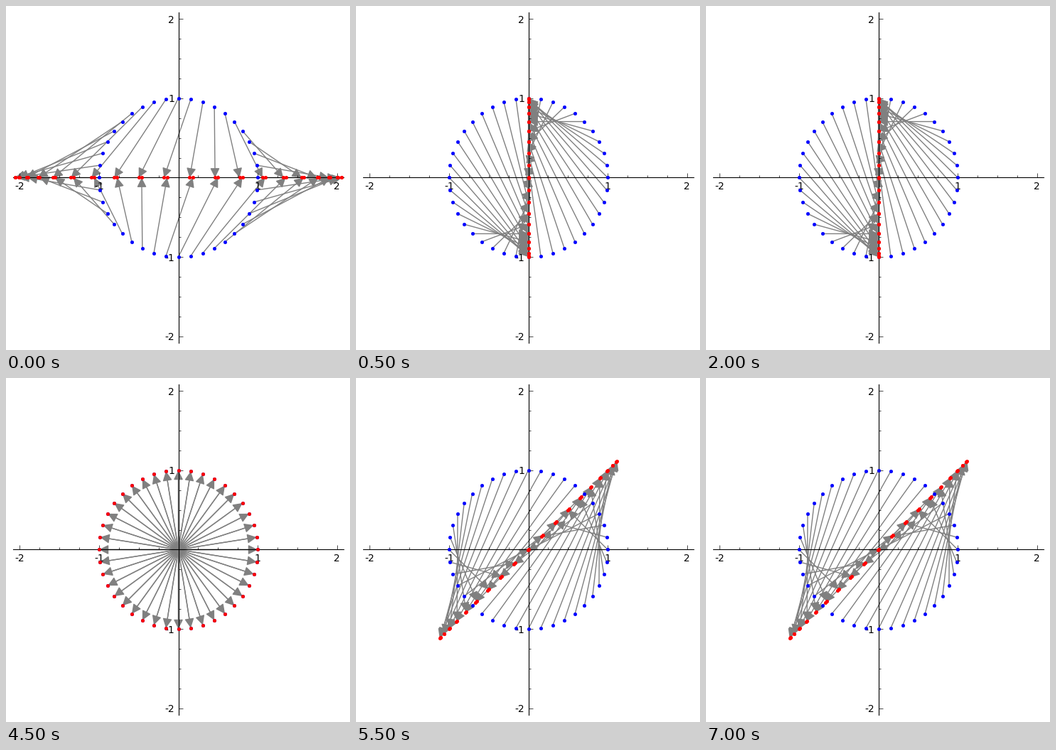
Write a matplotlib script that moves like this. It is 484x484 px and loops after 8000 ms.

```python
import matplotlib.pyplot as plt
import numpy as np
from matplotlib.animation import FuncAnimation
from matplotlib.patches import FancyArrowPatch

SIZE, DPI = 484, 100
UNIT = 111.6      # pixels per data unit
CENTRE = 242.5    # origin, from the left and from the bottom
HALF = 232.3      # half the axis length in pixels
STEP = 500        # ms per frame

# Linear maps shown in turn, with the number of steps each one stays
MAPS = [
    ([[2, -0.5], [0, 0]], 1),
    ([[0, 0], [1, 0]], 5),
    ([[-1, 0], [0, -1]], 5),
    ([[0.5, -1], [0.5, -1]], 5),
]
schedule = [np.array(m) for m, steps in MAPS for _ in range(steps)]

angles = 2 * np.pi * np.arange(40) / 40
circle = np.column_stack([np.cos(angles), np.sin(angles)])

plt.rcParams["font.family"] = "DejaVu Sans"
fig = plt.figure(figsize=(SIZE / DPI, SIZE / DPI), dpi=DPI, facecolor="white")
corner, side = (CENTRE - HALF) / SIZE, 2 * HALF / SIZE
ax = fig.add_axes([corner, corner, side, side])
limit = HALF / UNIT
ax.set(xlim=(-limit, limit), ylim=(-limit, limit))
ax.patch.set_visible(False)
ax.set_axisbelow(False)

for name in ("left", "bottom"):
    ax.spines[name].set_position("zero")
    ax.spines[name].set_linewidth(0.8)
for name in ("right", "top"):
    ax.spines[name].set_visible(False)

major = [-2, -1, 1, 2]
minor = [k / 4 for k in range(-8, 9) if k % 4]
for axis in (ax.xaxis, ax.yaxis):
    axis.set_ticks(major, labels=[str(v) for v in major])
    axis.set_ticks(minor, minor=True)
ax.tick_params(which="major", direction="in", length=4, width=0.5, pad=4,
               labelsize=10)
ax.tick_params(which="minor", direction="in", length=2, width=0.5)

arrows = []
for point in circle:
    arrow = FancyArrowPatch(point, 2 * point, lw=1, color="gray",
                            arrowstyle="-|>,head_width=4,head_length=8",
                            mutation_scale=1, shrinkA=0, shrinkB=0, zorder=2)
    arrows.append(ax.add_patch(arrow))


def dots(color, zorder):
    return ax.scatter(*circle.T, s=10, c=color, edgecolors=color,
                      linewidths=0.5, zorder=zorder, clip_on=False)


dots("blue", 5)
images = dots("red", 6)


def draw(frame):
    mapped = circle @ schedule[frame].T
    for arrow, start, end in zip(arrows, circle, mapped):
        arrow.set_positions(tuple(start), tuple(end))
    images.set_offsets(mapped)
    return [*arrows, images]


anim = FuncAnimation(fig, draw, frames=len(schedule), interval=STEP,
                     repeat=True, repeat_delay=0, blit=False)
plt.show()
```
